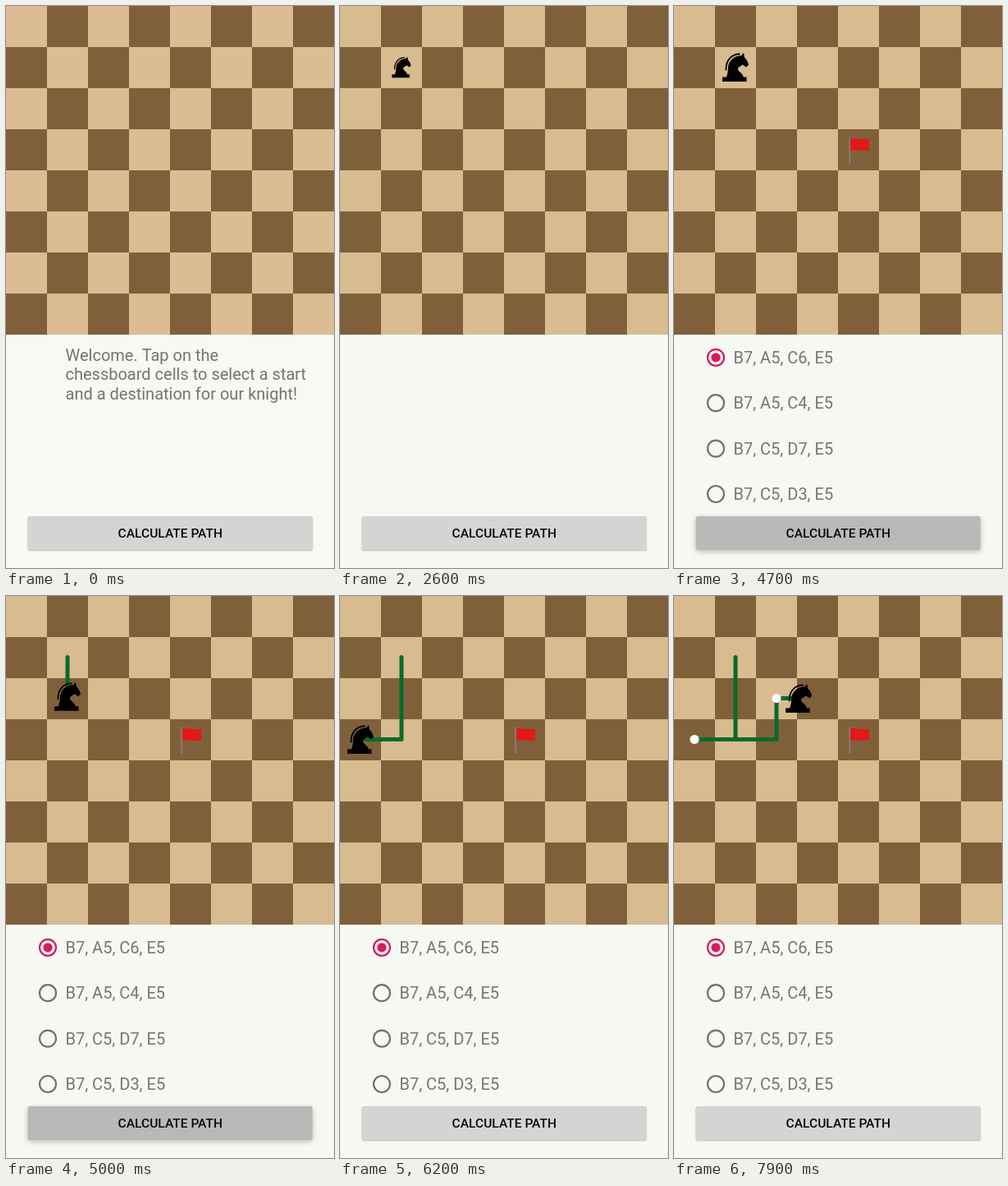
Animation of 400x684 px, one loop 8000 ms. Source, as an HTML page with a canvas:

```html
<!DOCTYPE html>
<html lang="en">
<head>
<meta charset="utf-8">
<title>Knight path</title>
<style>
  html, body { margin: 0; height: 100%; overflow: hidden; background: #f6f8f4; }
  canvas { display: block; }
</style>
</head>
<body>
<canvas id="stage" width="400" height="684"></canvas>
<script>
const ctx = document.getElementById('stage').getContext('2d');
const LOOP = 8000, TICK = 100;
const FIRST_MOVE = 4780, MOVE_GAP = 1500, MOVE_TIME = 1260;

const welcome = ['Welcome. Tap on the', 'chessboard cells to select a start', 'and a destination for our knight!'];
const routes = ['B7, A5, C6, E5', 'B7, A5, C4, E5', 'B7, C5, D7, E5', 'B7, C5, D3, E5'];
// Each move is an L: start, corner, end.
const moves = [
  [[75, 74.5], [75, 174.5], [25, 174.5]],
  [[25, 174.5], [125, 174.5], [125, 124.5]],
  [[125, 124.5], [225, 124.5], [225, 174.5]]
];

const body = new Path2D('M-16 17.5H13.5V12H9.5C10 7 2 6 3 1C5 -1 7 -2 9 -3L13 0L16 -3C15 -7 13 -10 11 -12L10 -17.5L7 -14C-3 -14 -9 -6 -9 0C-9 5 -10 8 -11 12H-16Z');
const mane = new Path2D('M5 -16C-5 -16 -12 -8 -11.5 3');
const cloth = new Path2D('M-10 -13C-5 -16 2 -11 13 -13.5V.5C3 2 -2 -1 -10 1.5Z');

const clamp = x => Math.max(0, Math.min(1, x));
const easeOut = x => 1 - (1 - clamp(x)) ** 2;

function disc(x, y, r, color) {
  ctx.fillStyle = color;
  ctx.beginPath();
  ctx.arc(x, y, r, 0, 7);
  ctx.fill();
}

function at(x, y, scale, paint) {
  ctx.save();
  ctx.translate(x, y);
  ctx.scale(scale, scale);
  paint();
  ctx.restore();
}

function text(str, x, y, color, font) {
  ctx.fillStyle = color;
  ctx.font = font;
  ctx.fillText(str, x, y);
}

function board(t) {
  ctx.fillStyle = t < 700 ? '#f9f8f4' : '#f6f8f4';
  ctx.fillRect(0, 0, 400, 684);
  for (let i = 0; i < 64; i++) {
    const col = i % 8, row = i >> 3;
    ctx.fillStyle = (col + row) % 2 ? '#80603b' : t < 700 ? '#dcbc93' : '#d8bb8f';
    ctx.fillRect(col * 50, row * 50, 50, 50);
  }
}

function button(t) {
  const press = t < 4700 ? 0 : 1 - clamp((t - 5000) / 400);
  const shade = Math.round(212 - 27 * press);
  ctx.save();
  ctx.shadowColor = 'rgba(0,0,0,.25)';
  ctx.shadowBlur = 2 + 4 * press;
  ctx.shadowOffsetY = 1 + press;
  ctx.fillStyle = `rgb(${shade},${shade + 1},${shade - 1})`;
  ctx.beginPath();
  ctx.roundRect(26.7, 621, 347, 41, 2.2);
  ctx.fill();
  ctx.restore();
  ctx.textAlign = 'center';
  text('CALCULATE PATH', 200.3, 647, '#080808', '500 15.55px Roboto, sans-serif');
  ctx.textAlign = 'left';
}

function panel(t) {
  const font = '20px Roboto, sans-serif';
  if (t < 2600) welcome.forEach((s, i) => text(s, 72.5, 432 + i * 23.4, '#747472', font));
  if (t >= 4700) routes.forEach((s, i) => {
    const y = 427.8 + i * 55.4, color = i ? '#707270' : '#d81b60';
    ctx.strokeStyle = color;
    ctx.lineWidth = 2.2;
    ctx.beginPath();
    ctx.arc(51, y, 10, 0, 7);
    ctx.stroke();
    if (!i) disc(51, y, 5.6, color);
    text(s, 72.5, y + 7, '#747674', font);
  });
  button(t);
}

// Draws the travelled line and returns the knight's place.
function trail(t) {
  let [x, y] = moves[0][0];
  const stops = [];
  ctx.strokeStyle = '#0a6a2a';
  ctx.lineWidth = 5;
  ctx.lineCap = ctx.lineJoin = 'round';
  ctx.beginPath();
  ctx.moveTo(x, y);
  moves.forEach((points, k) => {
    let left = 150 * easeOut((t - FIRST_MOVE - k * MOVE_GAP) / MOVE_TIME);
    if (!left) return;
    if (k) stops.push(points[0]);
    for (let i = 1; i < points.length && left > 0; i++) {
      const [px, py] = points[i - 1], [qx, qy] = points[i];
      const length = Math.hypot(qx - px, qy - py), part = Math.min(1, left / length);
      x = px + (qx - px) * part;
      y = py + (qy - py) * part;
      ctx.lineTo(x, y);
      left -= length;
    }
  });
  if (t > FIRST_MOVE) ctx.stroke();
  stops.forEach(p => disc(...p, 5.6, '#fff'));
  return [x, y];
}

function draw(t) {
  board(t);
  panel(t);
  const flagSize = easeOut((t - 3705) / 140);
  if (flagSize) at(225, 175, flagSize, () => {
    ctx.fillStyle = '#85837c';
    ctx.fillRect(-11.5, -15, 1.6, 32);
    ctx.fillStyle = '#e01a17';
    ctx.fill(cloth);
  });
  const [x, y] = trail(t);
  const knightSize = easeOut((t - 2505) / 200);
  if (knightSize) at(x, y, knightSize, () => {
    ctx.fillStyle = ctx.strokeStyle = '#000';
    ctx.lineWidth = 1.8;
    ctx.fill(body);
    ctx.stroke(mane);
  });
}

// The screen refreshes ten times a second.
function frame() {
  draw(Math.floor(performance.now() % LOOP / TICK) * TICK);
  requestAnimationFrame(frame);
}
frame();
</script>
</body>
</html>
```
